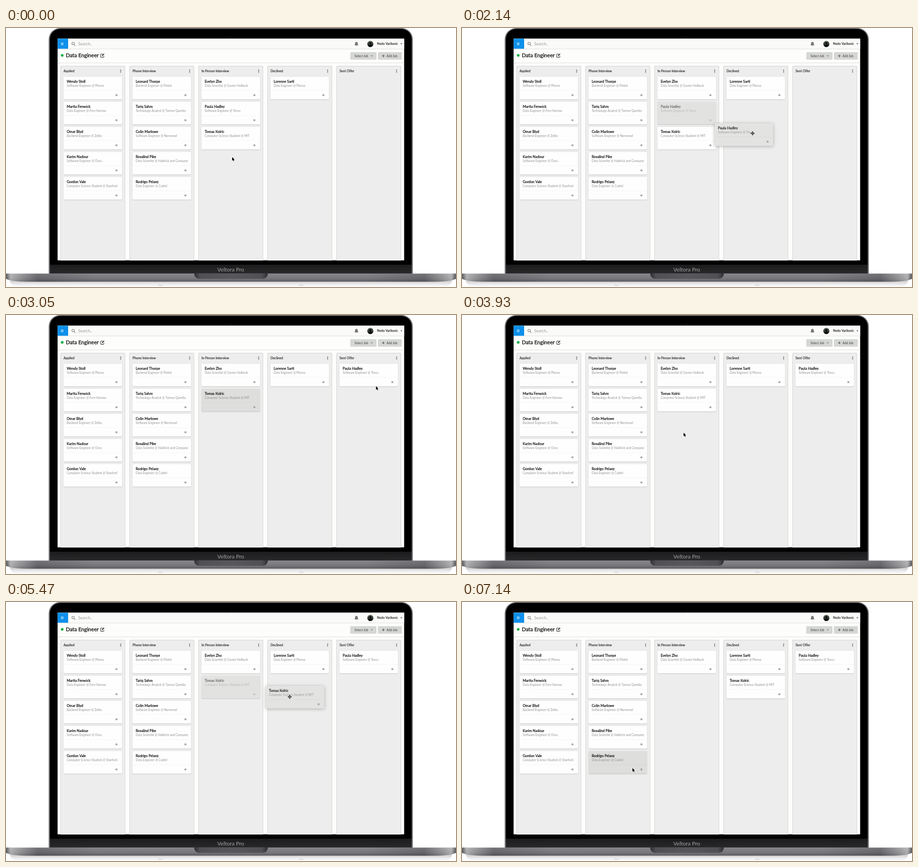
An HTML page with a canvas that plays this animation: 985x568 px, repeating every 7170 ms.

```html
<!DOCTYPE html>
<html lang="en">
<head>
<meta charset="utf-8">
<title>Hiring board</title>
<style>
html, body { margin: 0; width: 100%; height: 100%; overflow: hidden; background: #fff; }
canvas { display: block; width: 985px; height: 568px; }
</style>
</head>
<body>
<canvas id="stage"></canvas>
<script>
const W = 985, H = 568, LOOP = 7170;
const canvas = document.getElementById('stage');
const dpr = window.devicePixelRatio || 1;
canvas.width = W * dpr;
canvas.height = H * dpr;
const ctx = canvas.getContext('2d');
ctx.scale(dpr, dpr);

const FONT = 'Lato, "Open Sans", sans-serif';
const SCREEN = { x: 112.7, y: 23.2, w: 759, h: 486.5 };
const CARD_W = 128, CARD_H = 49.5, STEP = 55;
const CARD_FILL = { plain: '#fefefe', pressed: '#dededd', faded: '#e2e2e1', ghost: '#e3e3e2' };

const card = (name, role) => ({ name, role });
const paula = card('Paula Hadley', 'Software Engineer @ Trevu');
const tomas = card('Tomas Kolric', 'Computer Science Student @ MIT');
const rodrigo = card('Rodrigo Pelaez', 'Data Engineer @ Codrel');
const evelyn = card('Evelyn Zho', 'Data Scientist @ Garner Holbeck');
const lorenne = card('Lorenne Sarti', 'Data Engineer @ Plenvo');

const applied = [
  card('Wendy Stoll', 'Software Engineer @ Plenvo'),
  card('Marita Fenwick', 'Data Engineer @ Fern Harrow'),
  card('Omar Blyd', 'Backend Engineer @ Zelbo'),
  card('Karim Nadour', 'Software Engineer @ Ovra'),
  card('Gordon Vale', 'Computer Science Student @ Stanford')
];
const phone = [
  card('Leonard Thorpe', 'Backend Engineer @ Flintel'),
  card('Tariq Sahm', 'Technology Analyst @ Tarrow Quenby'),
  card('Colin Marlowe', 'Software Engineer @ Norvessel'),
  card('Rosalind Pike', 'Data Scientist @ Haldrick and Company'),
  rodrigo
];
const TITLES = ['Applied', 'Phone Interview', 'In Person Interview', 'Declined', 'Sent Offer'];

// Pointer path: time, x, y
const PATH = [
  [0, 495, 283], [30, 495, 283], [600, 497, 236], [910, 497, 236],
  [1130, 498, 175], [1230, 498, 175], [1380, 511, 184], [1450, 511, 184],
  [1640, 524, 193], [2140, 636, 231], [2360, 700, 222], [2780, 813, 153],
  [2990, 813, 153], [3050, 810, 156], [3680, 579, 230], [3930, 485, 258],
  [4250, 485, 258], [4500, 480.5, 186], [4640, 480.5, 186], [4810, 489, 211],
  [4970, 510, 211], [5470, 621, 208], [5640, 638, 203], [6070, 638, 203],
  [6760, 412, 335], [6830, 412, 335], [7110, 373, 364], [LOOP, 373, 364]
];
const DRAGS = [
  { item: paula, press: 1290, start: 1450, end: 2780, x: 511, y: 184 },
  { item: tomas, press: 4510, start: 4640, end: 5640, x: 480.5, y: 186 }
];

function pointer(t) {
  let i = 1;
  while (i < PATH.length - 1 && t > PATH[i][0]) i++;
  const [t0, x0, y0] = PATH[i - 1], [t1, x1, y1] = PATH[i];
  const p = (t - t0) / (t1 - t0);
  const k = p * 0.5 + p * p * (3 - 2 * p) * 0.5;
  return { x: x0 + (x1 - x0) * k, y: y0 + (y1 - y0) * k };
}

function rect(x, y, w, h, fill) {
  ctx.fillStyle = fill;
  ctx.fillRect(x, y, w, h);
}
function round(x, y, w, h, r, fill) {
  ctx.beginPath();
  ctx.roundRect(x, y, w, h, r);
  ctx.fillStyle = fill;
  ctx.fill();
}
function disc(x, y, r, fill) {
  ctx.beginPath();
  ctx.arc(x, y, r, 0, 7);
  ctx.fillStyle = fill;
  ctx.fill();
}
function text(s, x, y, size, fill, weight = 400, align = 'left') {
  ctx.font = `${weight} ${size}px ${FONT}`;
  ctx.textAlign = align;
  ctx.fillStyle = fill;
  ctx.fillText(s, x, y);
}
// Medium weight: regular letters with a hairline outline
function medium(s, x, y, size, fill, align) {
  text(s, x, y, size, fill, 400, align);
  ctx.strokeStyle = fill;
  ctx.lineWidth = size * 0.035;
  ctx.strokeText(s, x, y);
}
function poly(points, fill) {
  ctx.beginPath();
  points.forEach(([x, y]) => ctx.lineTo(x, y));
  ctx.closePath();
  ctx.fillStyle = fill;
  ctx.fill();
}
function stroke(d, color, width) {
  ctx.strokeStyle = color;
  ctx.lineWidth = width;
  ctx.stroke(new Path2D(d));
}
function shade(x0, y0, x1, y1, ...stops) {
  const g = ctx.createLinearGradient(x0, y0, x1, y1);
  stops.forEach(([at, color]) => g.addColorStop(at, color));
  return g;
}
function shadow(color, blur, dy) {
  ctx.shadowColor = color;
  ctx.shadowBlur = blur * dpr;
  ctx.shadowOffsetY = dy * dpr;
}
function caret(x, y, fill) {
  poly([[x - 2, y - 1], [x + 2, y - 1], [x, y + 1.3]], fill);
}
function star(cx, cy, r, fill) {
  const pts = [];
  for (let i = 0; i < 10; i++) {
    const a = i * Math.PI / 5 - Math.PI / 2, d = i % 2 ? r * 0.48 : r;
    pts.push([cx + Math.cos(a) * d, cy + Math.sin(a) * d]);
  }
  poly(pts, fill);
}

function drawLaptop() {
  rect(0, 0, W, H, '#fff');
  round(93.5, 0, 797, 545, [25, 25, 0, 0], '#6f6f73');
  round(96, 2, 792, 543, [22.5, 22.5, 0, 0], '#000');
  disc(492.5, 20.5, 2, '#101116');
  rect(96, 519, 792, 20, shade(0, 519, 0, 539, [0, '#1c1c1d'], [1, '#29292b']));
  text('Veltora Pro', 492, 533.8, 12, '#a4a4a6', 400, 'center');

  const soft = shade(0, 555, 0, 568, [0, '#cfcfd1'], [0.5, '#ebebec'], [1, '#fff']);
  round(8, 550, 969, 18, [0, 0, 18, 18], soft);
  [338, 646].forEach(x => round(x - 5, 563, 10, 2.5, 1, '#dddddf'));

  const base = new Path2D('M0 538.5H985V550Q972 556 940 556.5H45Q13 556 0 550Z');
  ctx.fillStyle = shade(0, 538, 0, 557,
    [0, '#a0a0a4'], [0.1, '#858589'], [0.6, '#77777b'], [0.9, '#616165'], [1, '#77777b']);
  ctx.fill(base);
  ctx.fillStyle = shade(0, 0, W, 0,
    [0, 'rgba(30,30,34,.4)'], [0.01, 'rgba(255,255,255,.4)'], [0.03, 'rgba(255,255,255,.2)'],
    [0.07, 'rgba(30,30,34,.2)'], [0.2, 'rgba(30,30,34,0)'], [0.8, 'rgba(30,30,34,0)'],
    [0.93, 'rgba(30,30,34,.2)'], [0.97, 'rgba(255,255,255,.2)'],
    [0.99, 'rgba(255,255,255,.4)'], [1, 'rgba(30,30,34,.4)']);
  ctx.fill(base);
  round(412, 538, 161, 12, [0, 0, 11, 11], shade(412, 0, 573, 0,
    [0, '#303033'], [0.08, '#515155'], [0.5, '#58585c'], [0.92, '#515155'], [1, '#303033']));
}

function drawTopBar() {
  const { x, y, w, h } = SCREEN;
  rect(x, y, w, h, '#fdfefc');
  rect(x, y, w, 22.5, '#fafbf9');
  rect(x, 45.5, w, 1, '#dddedd');
  rect(x, y, 23.3, 22.3, '#0e90ea');
  for (let i = 0; i < 3; i++) rect(120.3, 32.3 + i * 2, 5.4, 0.9, '#fff');

  stroke('M149.6 34a2.7 2.7 0 1 1-5.4 0a2.7 2.7 0 1 1 5.4 0M148.9 36.2l3 3.2', '#8b8b8b', 1.3);
  text('Search..', 158, 38.2, 9, '#9a9a9a');

  ctx.fillStyle = '#777';
  ctx.fill(new Path2D('M767 30.3q-3 .4-3 4q0 2.5-1.3 3.7h8.6q-1.3-1.2-1.3-3.7q0-3.6-3-4M766 38.6h2.2q-1.1 1.8-2.2 0'));

  ctx.save();
  ctx.beginPath();
  ctx.arc(797.5, 35, 6.7, 0, 7);
  ctx.clip();
  rect(790, 28, 15, 14, shade(0, 28, 0, 42, [0, '#5d6659'], [0.5, '#353a36'], [1, '#17191d']));
  disc(797.5, 33.5, 2.4, '#0e0f11');
  disc(797.5, 41, 4.8, '#0e0f11');
  ctx.restore();
  medium('Nedo Varikovic', 858, 37.2, 6.9, '#333', 'right');
  caret(865.3, 34.8, '#333');
}

function drawHeading() {
  disc(123, 60, 3, '#21b04b');
  medium('Data Engineer', 131, 63.6, 11.6, '#1c1c1c');
  stroke('M212 57h-3.5q-1.6 0-1.6 1.6v4.2q0 1.6 1.6 1.6h4.2q1.6 0 1.6-1.6v-1.6', '#333', 1.1);
  stroke('M210 61.3l4.7-4.6', '#333', 1.9);
  round(753.5, 53, 57.5, 16.5, 2, '#d5d7d5');
  round(814, 53, 52.5, 16.5, 2, '#d5d7d5');
  text('Select Job', 763, 63.6, 6.6, '#606160', 700);
  caret(800.5, 61.3, '#606160');
  stroke('M823.3 61.2h5.4M826 58.5v5.4', '#606160', 1.4);
  text('Add Job', 833, 63.6, 6.6, '#606160', 700);
  rect(SCREEN.x, 76, SCREEN.w, 1, '#dcdddb');
}

function drawCard(item, x, y, look) {
  ctx.save();
  if (look === 'ghost') shadow('rgba(0,0,0,.28)', 7, 1);
  else shadow('rgba(0,0,0,.22)', 1.5, 0.8);
  round(x, y, CARD_W, CARD_H, 2, CARD_FILL[look]);
  shadow('transparent', 0, 0);
  if (look === 'faded') ctx.globalAlpha = 0.5;
  if (look === 'ghost') ctx.globalAlpha = 0.88;
  rect(x, y + 29.5, CARD_W, 0.8, look === 'plain' ? '#f2f2f1' : '#d6d6d5');
  medium(item.name, x + 7, y + 13, 7.7, '#151515');
  text(item.role, x + 7, y + 21.6, 6.6, '#8f8f8f');
  star(x + 115.7, y + 40.2, 3.3, '#a0a0a0');
  ctx.restore();
}

function drawColumn(i, items, look) {
  const x = 119 + i * 151;
  round(x, 83, 142, 430, [2, 2, 0, 0], '#d2d2d3');
  round(x + 0.9, 83.9, 140.2, 430, [2, 2, 0, 0], '#ededed');
  medium(TITLES[i], x + 7, 97, 7.1, '#333');
  for (let k = 0; k < 3; k++) disc(x + 132, 92.2 + k * 2.4, 0.85, '#333');
  items.forEach((item, k) => drawCard(item, x + 7, 107 + k * STEP, look(item)));
}

function drawArrow(x, y) {
  ctx.save();
  ctx.translate(x, y);
  const p = new Path2D('M0 0V8L1.8 6.4L3.1 9.2L4.5 8.6L3.2 5.8H5.6Z');
  ctx.strokeStyle = '#fff';
  ctx.lineWidth = 1.2;
  ctx.stroke(p);
  ctx.fillStyle = '#000';
  ctx.fill(p);
  ctx.restore();
}

function drawMove(x, y) {
  ctx.save();
  ctx.translate(x, y);
  for (const [color, line, grow] of [['#fff', 2.4, 0.6], ['#000', 1.2, 0]]) {
    stroke('M-3.5 0H3.5M0-3.5V3.5', color, line);
    for (let i = 0; i < 4; i++) {
      poly([[4.5 + grow, 0], [2.3 - grow / 2, -1.9 - grow], [2.3 - grow / 2, 1.9 + grow]], color);
      ctx.rotate(Math.PI / 2);
    }
  }
  ctx.restore();
}

function draw(t) {
  const at = pointer(t);
  const drag = DRAGS.find(d => t >= d.start && t < d.end);
  const offered = t >= DRAGS[0].end, declined = t >= DRAGS[1].end;

  const look = item => {
    if (drag && drag.item === item) return 'faded';
    if (DRAGS.some(d => d.item === item && t >= d.press && t < d.start)) return 'pressed';
    if (item === tomas && offered && t < 3110) return 'pressed';
    if (item === rodrigo && t >= 7020) return 'pressed';
    return 'plain';
  };
  const inPerson = [evelyn];
  if (!offered) inPerson.push(paula);
  if (!declined) inPerson.push(tomas);
  const board = [applied, phone, inPerson, declined ? [lorenne, tomas] : [lorenne], offered ? [paula] : []];

  drawLaptop();
  ctx.save();
  ctx.beginPath();
  ctx.rect(SCREEN.x, SCREEN.y, SCREEN.w, SCREEN.h);
  ctx.clip();
  drawTopBar();
  drawHeading();
  board.forEach((items, i) => drawColumn(i, items, look));
  if (drag) {
    drawCard(drag.item, 428 + at.x - drag.x, 162 + at.y - drag.y, 'ghost');
    drawMove(at.x, at.y);
  } else {
    drawArrow(at.x, at.y);
  }
  ctx.restore();
}

const begin = performance.now();
function tick() {
  draw((performance.now() - begin) % LOOP);
  requestAnimationFrame(tick);
}
tick();
</script>
</body>
</html>
```
